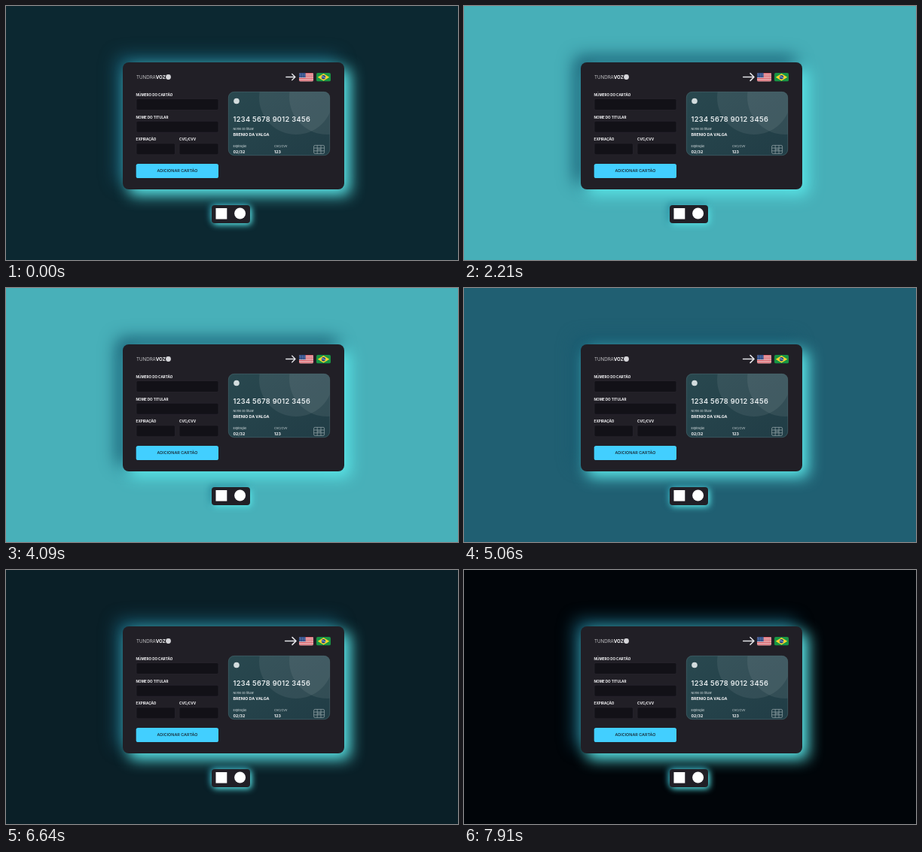
An HTML page that plays this animation: 600x338 px, repeating every 7.94 s.

```html
<!DOCTYPE html>
<html lang="pt-BR">
<head>
<meta charset="utf-8">
<title>Cartão</title>
<style>
  html, body { margin: 0; width: 100%; height: 100%; overflow: hidden; }
  body { position: relative; background: #0c2831; }
  .box { position: absolute; background: #211f26; }
  .panel {
    left: 154.5px; top: 75px; width: 294px; height: 169px; border-radius: 8px;
    box-shadow: 8px 8px 19px #5ce9ea, -8px -8px 22px #185a70;
  }
  .social {
    left: 272.5px; top: 264.5px; width: 51.5px; height: 24.5px; border-radius: 4px;
    box-shadow: 2px 2px 9px #5ce9ea, -2px -2px 8px #237c92;
  }
  svg { position: absolute; left: 0; top: 0; }
  text { font-family: Inter, Arial, sans-serif; fill: #f4f4f6; }
  .label { font-size: 4.6px; font-weight: 700; }
  .tiny { font-size: 3.8px; fill: #dfe6e8; }
  .value { font-size: 5.3px; font-weight: 700; }
  .field { fill: #121117; stroke: #29262f; stroke-width: .7; }
</style>
</head>
<body>
<div class="box panel"></div>
<div class="box social"></div>

<svg width="600" height="338" viewBox="0 0 600 338">
  <defs>
    <linearGradient id="face" x1="0" y1="0" x2="1" y2="1">
      <stop offset="0" stop-color="#29484f"/>
      <stop offset="1" stop-color="#213d46"/>
    </linearGradient>
    <clipPath id="cardClip"><rect x="295" y="114" width="135" height="85" rx="8"/></clipPath>
    <clipPath id="flagClip"><rect width="19" height="11.5" rx="2"/></clipPath>
  </defs>

  <text x="173" y="96.7" font-size="6.2" font-weight="300">TUNDRA<tspan font-weight="700">VOZ</tspan></text>
  <circle cx="215.5" cy="94.5" r="3.4" fill="#d6d6da"/>

  <path id="arrow" d="M-6.5 0H6M1.8 -4.3L6.2 0L1.8 4.3" fill="none" stroke="#e4e4e8"
        stroke-width="1.4" stroke-linecap="round" stroke-linejoin="round"/>

  <g transform="translate(389 89)" clip-path="url(#flagClip)">
    <rect width="19" height="11.5" fill="#f3eeee"/>
    <g id="stripes" fill="#cf2f3d"></g>
    <rect width="8.6" height="6.2" fill="#2b4a86"/>
    <g id="stars" fill="#dfe5f2"></g>
  </g>
  <g transform="translate(412 89)" clip-path="url(#flagClip)">
    <rect width="19" height="11.5" fill="#189544"/>
    <path d="M9.5 1L17.2 5.75L9.5 10.5L1.8 5.75Z" fill="#f6d52e"/>
    <circle cx="9.5" cy="5.75" r="2.7" fill="#254a87"/>
    <path d="M7 5.1Q9.8 4.9 11.9 6.8" fill="none" stroke="#fff" stroke-width=".6"/>
  </g>

  <g class="labels">
    <text class="label" x="172.6" y="120">NÚMERO DO CARTÃO</text>
    <text class="label" x="172.6" y="149.6">NOME DO TITULAR</text>
    <text class="label" x="172.6" y="179.2">EXPIRAÇÃO</text>
    <text class="label" x="230" y="179.2">CVC/CVV</text>
  </g>
  <rect class="field" x="173" y="123.5" width="109" height="15" rx="2"/>
  <rect class="field" x="173" y="153.2" width="109" height="15" rx="2"/>
  <rect class="field" x="173" y="182.8" width="51.5" height="15" rx="2"/>
  <rect class="field" x="230" y="182.8" width="52" height="15" rx="2"/>

  <rect x="172.7" y="210" width="109.3" height="19" rx="2.6" fill="#42cfff"/>
  <text x="227.4" y="221.4" font-size="5.45" font-weight="500" text-anchor="middle" style="fill:#16222b">ADICIONAR CARTÃO</text>

  <g clip-path="url(#cardClip)">
    <rect x="295" y="114" width="135" height="85" fill="url(#face)"/>
    <circle cx="385" cy="122" r="49" fill="#fff" opacity=".07"/>
    <circle cx="426" cy="121" r="50" fill="#fff" opacity=".07"/>
  </g>
  <rect x="295.3" y="114.3" width="134.4" height="84.4" rx="7.8" fill="none" stroke="#47636b" stroke-width=".6"/>
  <circle cx="306" cy="126.5" r="3.8" fill="#d3dcde"/>
  <text x="301.4" y="153.8" font-size="9.2" font-weight="600" letter-spacing=".35" style="fill:#e6ecee">1234 5678 9012 3456</text>
  <text class="tiny" x="301.5" y="165">Nome do titular</text>
  <text class="value" x="301.5" y="172.8">BRENIO DA VALGA</text>
  <text class="tiny" x="301.5" y="188.4">Expiração</text>
  <text class="value" x="301.5" y="196.3">02/32</text>
  <text class="tiny" x="356" y="188.4">CVC/CVV</text>
  <text class="value" x="356" y="196.3">123</text>
  <g fill="none" stroke="#9aa9ad" stroke-width=".7">
    <rect x="408.6" y="185.4" width="14" height="11" rx="1.6"/>
    <path d="M408.6 189H422.6M408.6 192.8H422.6M413.2 185.4V196.4M418 185.4V196.4M413.2 190.9H418"/>
  </g>

  <rect x="278.5" y="269" width="14.8" height="14.6" fill="#fff"/>
  <circle cx="310.6" cy="276" r="7.5" fill="#fff"/>
</svg>

<script>
const LOOP = 7940;
const TAU = Math.PI * 2;

// Backdrop tones from the darkest to the lightest point of the pulse.
const TONES = [
  [0, [1, 4, 8]],
  [.215, [10, 31, 39]],
  [.296, [12, 40, 49]],
  [.5, [19, 64, 79]],
  [.684, [32, 95, 114]],
  [.917, [72, 176, 185]],
  [1, [84, 200, 206]]
];

const arrow = document.getElementById('arrow');

function addRect(parent, x, y, width, height) {
  const rect = document.createElementNS('http://www.w3.org/2000/svg', 'rect');
  const attrs = { x, y, width, height };
  for (const key in attrs) rect.setAttribute(key, attrs[key]);
  parent.append(rect);
}

function drawFlagDetails() {
  const stripe = 11.5 / 13;
  for (let i = 0; i < 13; i += 2) addRect(stripes, 0, i * stripe, 19, stripe);
  for (let row = 0; row < 4; row++)
    for (let col = 0; col < 5; col++)
      addRect(stars, .8 + col * 1.6, .8 + row * 1.4, .5, .5);
}

function toneAt(level) {
  let i = 1;
  while (i < TONES.length - 1 && level > TONES[i][0]) i++;
  const [from, a] = TONES[i - 1];
  const [to, b] = TONES[i];
  const k = (level - from) / (to - from);
  return `rgb(${a.map((v, c) => Math.round(v + (b[c] - v) * k))})`;
}

// A wave with its crest at the given time.
const wave = (t, crest, period) => Math.cos(TAU * (t - crest) / period);

function draw() {
  const t = performance.now() % LOOP;
  document.body.style.background = toneAt((1 + wave(t, 3165, 10000)) / 2);
  const size = 1.03 + .11 * wave(t, 570, 1500);
  arrow.setAttribute('transform', `translate(378 94.5) scale(${size})`);
  requestAnimationFrame(draw);
}

const stripes = document.getElementById('stripes');
const stars = document.getElementById('stars');
drawFlagDetails();
draw();
</script>
</body>
</html>
```
